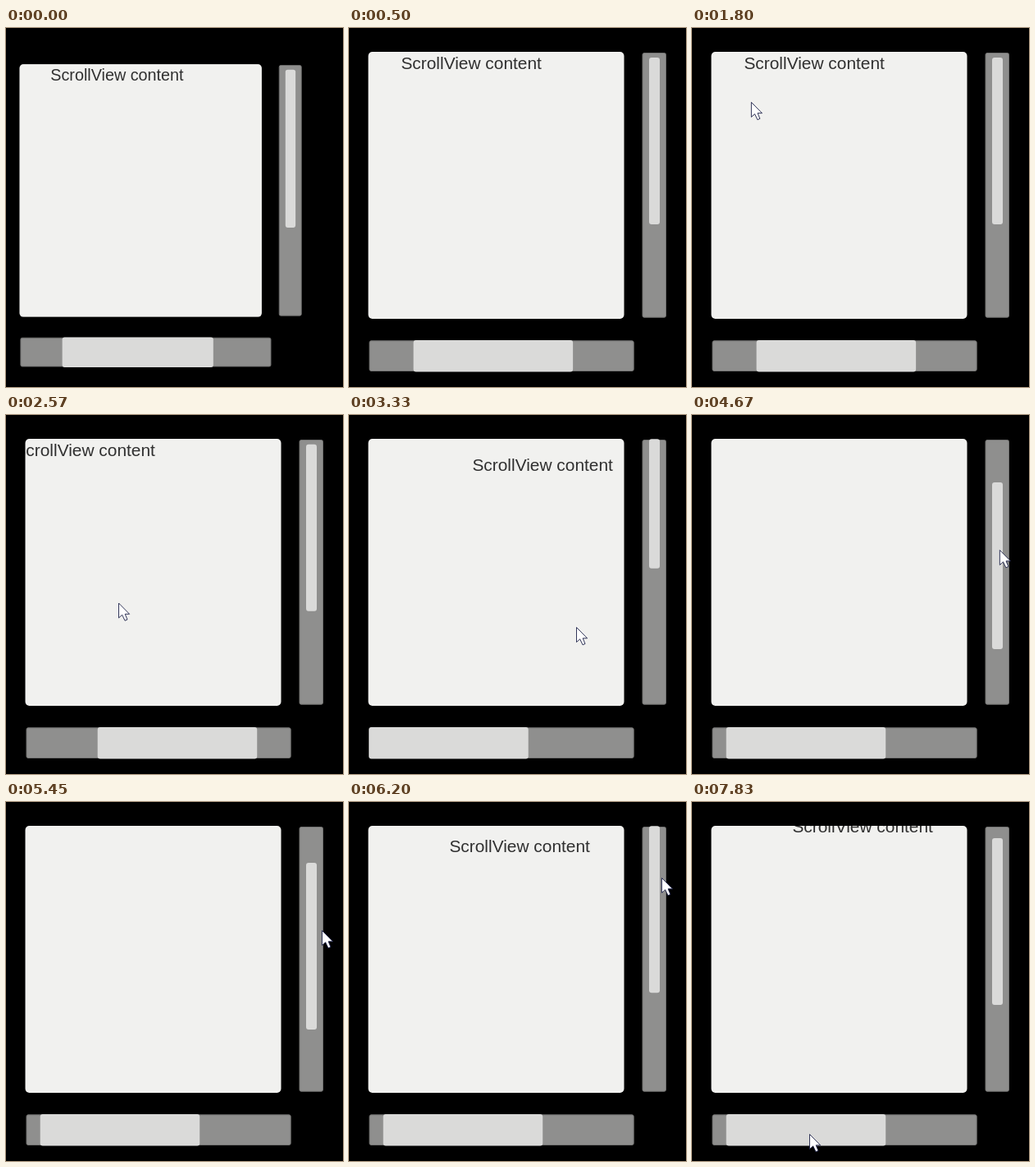
Animation, 411 px wide and 437 px high, one loop 8000 ms. Source, as an HTML page:

```html
<!DOCTYPE html>
<html lang="en">
<head>
<meta charset="utf-8">
<title>Scroll view</title>
<style>
html, body { margin: 0; width: 100%; height: 100%; overflow: hidden; background: #000; }
svg { display: block; width: 411px; height: 437px; }
.bar { fill: #8f8f8e; stroke: #70706f; }
.thumb { fill: #dadad9; }
text { font: 20.9px "Liberation Sans", Arial, sans-serif; fill: #303030; }
</style>
</head>
<body>
<svg viewBox="0 0 411 437">
  <defs>
    <clipPath id="view"><rect x="23.5" y="29" width="312" height="325" rx="5"/></clipPath>
  </defs>
  <rect width="411" height="437"/>
  <g id="panel">
    <g clip-path="url(#view)">
      <rect x="23" y="29" width="313" height="325" fill="#f1f1ef"/>
      <text id="label" x="63.4" y="50">ScrollView content</text>
    </g>
    <rect class="bar" x="358" y="30.5" width="28.5" height="321.7" rx="2"/>
    <rect class="bar" x="25" y="380.8" width="322.2" height="36.7" rx="2"/>
    <rect class="thumb" id="vThumb" x="366" width="13" rx="3"/>
    <rect class="thumb" id="hThumb" y="380" height="38.5" rx="3"/>
  </g>
  <path id="cursor" d="M.5 .5V18.5L4.7 14.8L8 21.8L11 20.5L8.2 13.8H13.6Z" fill="#fff" stroke="#1c2148" stroke-width=".9" stroke-linejoin="round"/>
</svg>
<script>
const LOOP = 8000, STEP = 95, EARLY = 12;
const ZOOM = 500, ENTER = 1490, DRAG = 2370, RELEASE = 3615, GRAB = 4110, LET_GO = 7265;
const RATIO = 1.6;              // content pixels per scrollbar pixel
const LIMIT = { x: 88, y: 11 }; // furthest regular scroll
const $ = id => document.getElementById(id);
const panel = $("panel"), label = $("label"), cursor = $("cursor");

const mix = (a, b, u) => a + (b - a) * u;
const line = (a, b, px = 1, py = px) => u => [mix(a[0], b[0], u ** px), mix(a[1], b[1], u ** py)];
const legs = (cut, f, g) => u => u <= cut ? f(u) : g((u - cut) / (1 - cut));

// Pointer gestures: start time, number of steps, position for progress 0..1
const gestures = [
  [ENTER, 9, line([1, 7], [190, 228])],
  [DRAG, 9, u => [137 + 180 * (u - .25) ** 2, 228 + 8 * u * u]],
  [3240, 9, legs(.5,
    u => [277 - 200 * (u - .125) ** 2, 258 - 83 * (u - .125) ** 2],
    line([249, 246], [360, 118]))],
  [GRAB, 9, line([366, 111], [387, 201], 3, 1.84)],
  [4980, 9, line([385, 201], [385, 129])],
  [5830, 5, line([385, 122], [381, 92])],
  [6400, 5, line([381, 97], [375, 139])],
  [7070, 9, legs(.25,
    u => [375, 138 - 48 * u],
    line([375, 126], [143, 404]))]
];

function pointer(t) {
  const [start, steps, at] = gestures.filter(g => g[0] <= t).pop() || gestures[0];
  const k = Math.floor((t - start + EARLY) / STEP);
  return at(Math.max(0, Math.min(1, k / (steps - 1))));
}

// How far the content sits from its resting place
function scrollAt(t, x, y) {
  if (t < DRAG) return [0, 0];
  if (t < RELEASE) return [x - 190, .6 * (y - 228)];
  const thumbY = t < GRAB ? 29 : t < LET_GO ? y - 82 : 44;
  return [59, Math.min(LIMIT.y, (36 - thumbY) * RATIO)];
}

// Thumbs stop at the track's end and shrink when pulled past it
function slide(thumb, axis, side, rest, size, moved) {
  const over = Math.max(0, moved - LIMIT[axis]);
  thumb.setAttribute(axis, rest - Math.min(moved, LIMIT[axis]) / RATIO);
  thumb.setAttribute(side, size - over * 6.5);
}

function draw(t) {
  const [x, y] = pointer(t);
  const [dx, dy] = scrollAt(t + EARLY, x, y);
  label.setAttribute("transform", `translate(${dx} ${dy})`);
  slide($("hThumb"), "x", "width", 78.6, 194.5, dx);
  slide($("vThumb"), "y", "height", 36, 203, dy);
  panel.setAttribute("transform", t < ZOOM ? "translate(-5.8 16.6) scale(.947)" : "");
  cursor.setAttribute("transform", `translate(${x} ${y})`);
  cursor.setAttribute("visibility", t < ENTER ? "hidden" : "visible");
}

const begin = performance.now();
function tick() {
  draw((performance.now() - begin) % LOOP);
  requestAnimationFrame(tick);
}
tick();
</script>
</body>
</html>
```
